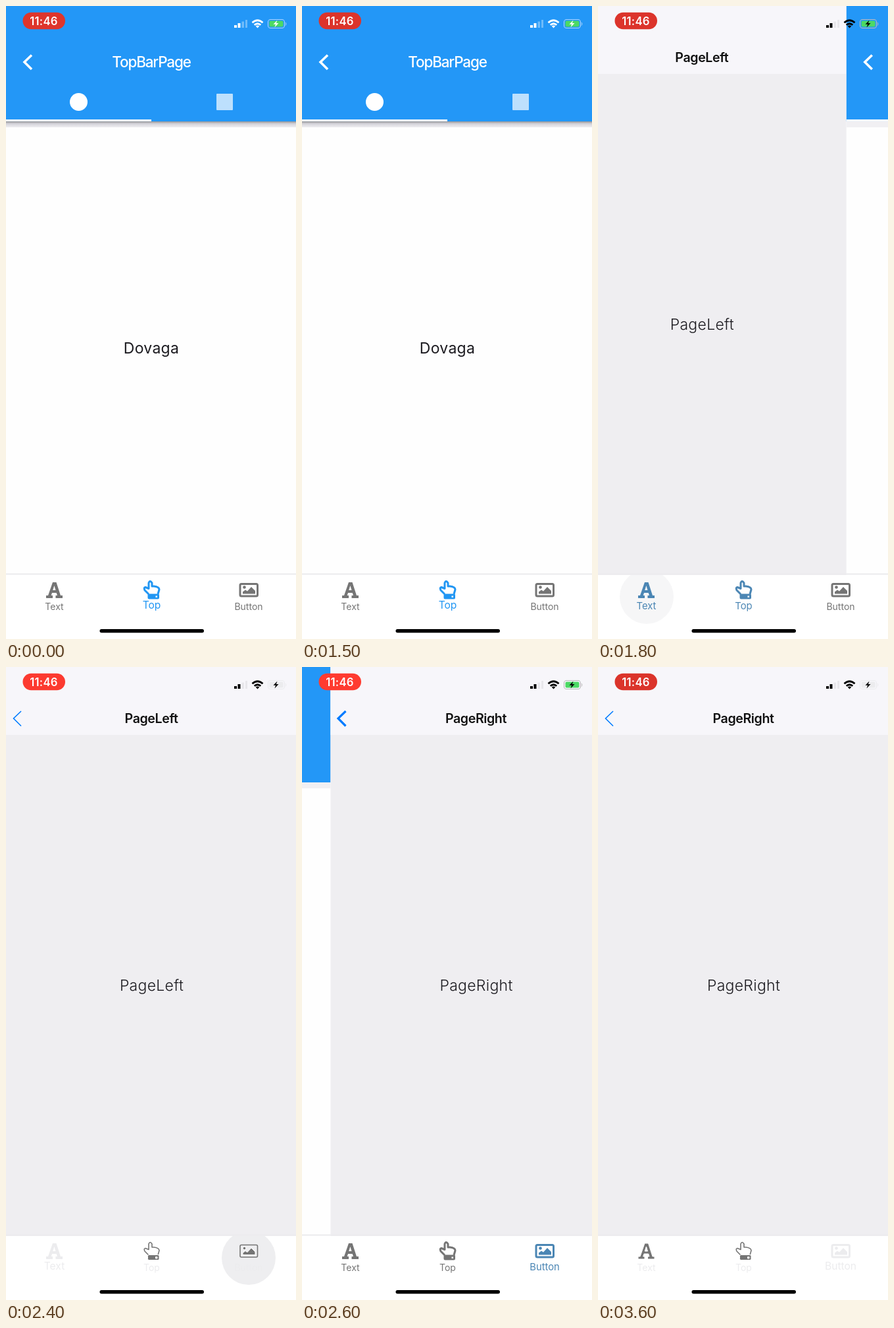
Animation of 441x960 px, one loop 3800 ms. Source, as an HTML page:

```html
<!DOCTYPE html>
<html lang="en">
<head>
<meta charset="utf-8">
<title>Page slider</title>
<style>
  html, body { margin: 0; width: 100%; height: 100%; overflow: hidden; background: #fff; }
  svg { display: block; width: 441px; height: 960px; font-family: Inter, "Open Sans", sans-serif; }
  text { text-anchor: middle; }
  .body { font-size: 23px; letter-spacing: .3px; fill: #1c1b20; }
  .page .body { font-weight: 350; }
  .title { font-size: 19.6px; font-weight: 600; letter-spacing: -.4px; fill: #111; }
  .line { fill: none; stroke: currentColor; stroke-width: 3; }
  .icon { fill: currentColor; }
</style>
</head>
<body>
<svg viewBox="0 0 441 960">
  <defs>
    <linearGradient id="shade" x2="0" y2="1">
      <stop stop-color="#555" stop-opacity=".6"/>
      <stop offset=".4" stop-color="#778" stop-opacity=".25"/>
      <stop offset="1" stop-color="#889" stop-opacity=".02"/>
    </linearGradient>
    <clipPath id="navClip"><path d="M0 863h441v97H0z"/></clipPath>
  </defs>

  <g id="left" class="page"></g>

  <g id="top">
    <path fill="#fefefe" d="M0 0h441v863H0z"/>
    <g id="tabBodies">
      <text class="body" x="221" y="527">Dovaga</text>
      <text class="body" x="662" y="527">Bravendo</text>
    </g>
    <path fill="#f1f0f3" d="M0 175h441v9H0z"/>
    <path id="shadow" fill="url(#shade)" d="M0 175h441v9H0z"/>
    <path fill="#2397f7" d="M0 0h441v175H0z"/>
    <path d="M39 74.500L28 85l11 11" fill="none" stroke="#fff" stroke-width="3.6"/>
    <text x="221" y="93" fill="#fff" font-size="22.500" font-weight="500" letter-spacing="-1.2">TopBarPage</text>
    <circle id="tabA" cx="110.500" cy="145.500" r="13.500" fill="#fff"/>
    <rect id="tabB" x="320" y="133" width="25" height="25" rx="1" fill="#fff"/>
    <rect id="indicator" y="172" width="221" height="3" fill="#f4f8fc"/>
  </g>

  <g id="right" class="page"></g>

  <g id="nav">
    <path fill="#fff" d="M0 863h441v97H0z"/>
    <path fill="#ececee" d="M0 860.500h441v2H0z"/>
    <circle id="ripple" cy="896" fill="#eeeef0" clip-path="url(#navClip)"/>

    <g class="item">
      <path class="icon" fill-rule="evenodd" d="M61 898v-4h3L71 874h5.500L83 894h3v4H75.500v-4h2.500l-1.300-4h-6.700l-1.300 4h2.300v4zM71.200 886h4.300L73.400 879z"/>
      <text x="73.500">Text</text>
    </g>
    <g class="item">
      <path class="line" stroke-linejoin="round" d="M217 892l-6-6q-2-4 1-4.500l5 2V875q2-5 5 0v5h3q8 1 8 5l-2 7"/>
      <path class="icon" fill-rule="evenodd" d="M217.500 891.500h13.500q2 0 2 2v4q0 2-2 2h-13.500q-2 0-2-2v-4q0-2 2-2zM227.500 894.500v2.500h2.500v-2.500z"/>
      <text x="221.500">Top</text>
    </g>
    <g class="item">
      <rect class="line" x="356" y="876.500" width="26.500" height="18.500" rx="2"/>
      <path class="icon" d="M360 891.500v-3l4-3 3 2 6-6.500 6 6v4.500z"/>
      <circle class="icon" cx="362.500" cy="881.500" r="2.300"/>
      <text x="369">Button</text>
    </g>
    <rect x="142.500" y="945" width="158.500" height="5.500" rx="2.700"/>
  </g>

  <g id="status">
    <rect id="pill" x="25.500" y="9.800" width="64.500" height="25.400" rx="12.700"/>
    <text x="57.500" y="28.800" fill="#fff" font-size="16.800" font-weight="600" letter-spacing=".2">11:46</text>
    <path class="icon" d="M347 29h4v4h-4zM352.500 26h4v7h-4z"/>
    <path id="weakBars" class="icon" d="M358.500 23.500h3.500V33h-3.500zM364 21h3v12h-3z"/>
    <path class="line" style="stroke-width:2.800" d="M374.500 25.300q8-7.200 16 0M377.700 28.800q4.800-4.200 9.600 0"/>
    <path class="icon" d="M382.500 33.500l-2.800-3q2.800-2 5.600 0z"/>
    <g id="battery">
      <rect x="398.500" y="20.500" width="25" height="13" rx="3.800" fill="none" stroke-width="1.100"/>
      <path d="M425 25q2 2 0 4.500" fill="none"/>
      <rect id="charge" x="400.500" y="22.500" width="21" height="9" rx="2"/>
    </g>
    <path class="icon" d="M412.500 21.500l-6 6.300h3.600l-1.600 4.700 6-6.500h-3.600z"/>
  </g>
</svg>

<script>
const LOOP = 3800, STEP = 100, WIDTH = 441;
const BLUE = '#2196f3', GREY = '#757575', PALE = '#ececee';
const $ = id => document.getElementById(id);
const items = [...document.querySelectorAll('.item')];

for (const [id, name] of [['left', 'PageLeft'], ['right', 'PageRight']])
  $(id).innerHTML = `
    <path fill="#efeef1" d="M0 0h441v863H0z"/>
    <path fill="#f7f6fa" d="M0 0h441v103H0z"/>
    <path class="arrow" d="M23 67L11.500 78 23 89.500" fill="none" stroke="#007aff"/>
    <text class="title" x="221" y="85">${name}</text>
    <text class="body" x="221.500" y="491">${name}</text>`;

const ramp = (t, from, to) => Math.min(1, Math.max(0, (t - from) / (to - from)));
const easeOut = x => 1 - (1 - x) ** 3;
const smooth = x => x * x * (3 - 2 * x);
const mix = (a, b, k) => `color-mix(in srgb, ${a}, ${b} ${k * 100}%)`;
const slide = (id, x) => $(id).setAttribute('transform', `translate(${x})`);

function drawTabs(t) {
  const tab = smooth(ramp(t, 150, 650)) - smooth(ramp(t, 850, 1350));
  slide('tabBodies', -WIDTH * tab);
  $('indicator').setAttribute('x', tab * WIDTH / 2);
  $('tabA').style.opacity = 1 - .3 * tab;
  $('tabB').style.opacity = .7 + .3 * tab;
}

function drawNav(t, fade) {
  const toLeft = ramp(t, 1700, 1900);
  const chosen = [toLeft - ramp(t, 2400, 2600), 1 - toLeft, ramp(t, 2500, 2700)];
  items.forEach((item, i) => {
    const on = chosen[i], thin = fade * (1 - on), color = mix(GREY, BLUE, on);
    item.style.color = mix(color, PALE, fade * on);
    for (const shape of item.querySelectorAll('.line')) shape.style.strokeWidth = 3 - 1.4 * thin;
    for (const shape of item.querySelectorAll('.icon')) {
      shape.style.stroke = '#fff';
      shape.style.strokeWidth = thin;
    }
    const label = item.querySelector('text');
    label.style.fontSize = 14 + 1.6 * on + 'px';
    label.style.fill = mix(color, PALE, fade);
    label.setAttribute('y', 916 - 2 * on);
  });

  const second = t >= 2200, age = t - (second ? 2250 : 1600);
  const ripple = $('ripple');
  ripple.setAttribute('cx', second ? 369 : 74);
  ripple.setAttribute('r', 41 * ramp(age, 0, 150));
  ripple.style.opacity = 1 - ramp(age, 150, 250);
}

function drawStatus(t, page, fade) {
  const dark = Math.abs(page - 1) > .5;
  $('status').style.color = dark ? '#000' : '#fff';
  $('weakBars').style.opacity = dark ? .06 : .35;
  const glow = (1 - Math.cos((t + 200) / 1850 * 2 * Math.PI)) / 2;
  $('pill').style.fill = mix('#da342b', '#ff3b30', glow);
  $('battery').style.stroke = mix(dark ? '#bbb' : '#a9d5fb', PALE, fade);
  $('charge').style.fill = mix('#4cd964', PALE, fade);
  $('charge').style.stroke = 'none';
}

function draw(t) {
  const page = 1 - easeOut(ramp(t, 1657, 1957)) + 2 * easeOut(ramp(t, 2410, 2710));
  const fade = t < 2500 ? ramp(t, 1900, 2300) : ramp(t, 2700, 3100);
  ['left', 'top', 'right'].forEach((id, i) => slide(id, WIDTH * (i - page)));
  $('shadow').style.opacity = page === 1 ? 1 : 0;
  document.querySelectorAll('.arrow').forEach(a => a.style.strokeWidth = 3.2 - 1.6 * fade);
  drawTabs(t);
  drawNav(t, fade);
  drawStatus(t, page, fade);
}

const start = performance.now();
function tick() {
  const t = (performance.now() - start) % LOOP;
  draw(Math.floor(t / STEP) * STEP);
  requestAnimationFrame(tick);
}
tick();
</script>
</body>
</html>
```
